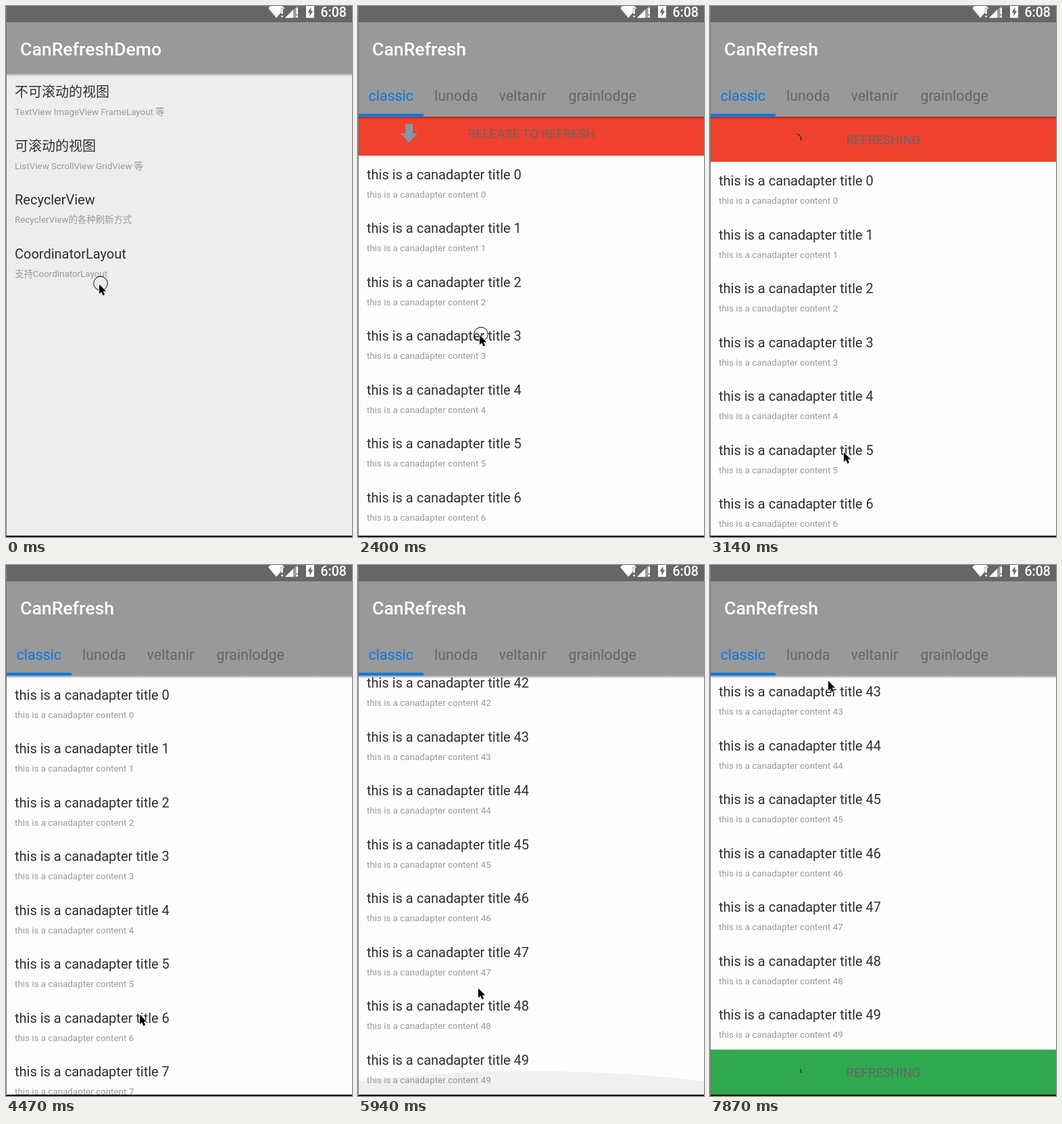
These frames come from a looping animation (512x784 px, 8000 ms). An HTML page:

```html
<!DOCTYPE html>
<html lang="zh-CN">
<head>
<meta charset="utf-8">
<title>CanRefresh</title>
<style>
  html, body { margin: 0; width: 100%; height: 100%; overflow: hidden; background: #000; }
  svg { display: block; font-family: Roboto, "Noto Sans CJK SC", "Noto Sans CJK", sans-serif; }
  .title { font-size: 20px; fill: #2f2f2f; }
  .sub { font-size: 13.4px; fill: #999; }
  .bar { font-size: 26.67px; font-weight: 500; fill: #fff; }
  .tab { font-size: 21.4px; fill: #666; }
  .tab.on { fill: #0a7ae0; }
  .state { font-size: 18.67px; fill: #666; text-anchor: middle; }
  .spin { fill: none; stroke: #333; stroke-width: 1.8; }
  .clock { font-size: 19.5px; font-weight: 500; fill: #fff; }
</style>
</head>
<body>
<svg width="512" height="784" viewBox="0 0 512 784">
  <defs>
    <linearGradient id="shade" x2="0" y2="1">
      <stop offset="0" stop-opacity=".36"/>
      <stop offset="1" stop-opacity="0"/>
    </linearGradient>
    <clipPath id="page"><path d="M0 0H512V782H0Z"/></clipPath>
  </defs>

  <g>
    <path d="M0 0H512V782H0Z" fill="#ededed"/>
    <path d="M0 24H512V99H0Z" fill="#999"/>
    <path d="M0 0H512V24H0Z" fill="#666"/>
    <path d="M0 99H512V104H0Z" fill="url(#shade)"/>
    <text class="bar" x="21" y="72.5">CanRefreshDemo</text>
    <g id="menu"></g>
  </g>

  <g id="window" clip-path="url(#page)">
    <path d="M0 0H512V782H0Z" fill="#fdfdfd"/>
    <path id="red" d="M0 0H512V782H0Z" fill="#ef412e"/>
    <path id="green" d="M0 0H512V782H0Z" fill="#2fa84f"/>
    <g id="header"></g>
    <g id="footer"></g>
    <g id="list"></g>
    <ellipse id="glow" cx="256" rx="768"/>
    <path d="M0 24H512V163.5H0Z" fill="#999"/>
    <path d="M0 0H512V24H0Z" fill="#666"/>
    <path d="M0 163.5H512V167.5H0Z" fill="url(#shade)"/>
    <text class="bar" x="21" y="72.5">CanRefresh</text>
    <text class="tab on" x="15.5" y="139.5">classic</text>
    <text class="tab" x="113" y="139.5">lunoda</text>
    <text class="tab" x="208.5" y="139.5">veltanir</text>
    <text class="tab" x="311.5" y="139.5">grainlodge</text>
    <path d="M1 159H97V163.3H1Z" fill="#0a7ae0"/>
  </g>

  <g fill="#fff">
    <path d="M388 3Q400 -8 412 3L407.5 8.500V9L400 17.500Z"/>
    <path d="M407 3H410V12H407ZM407 14H410V17H407Z" stroke="#666" stroke-width=".6"/>
    <path d="M413 17.500L432 -1V17.500Z" opacity=".35"/>
    <path d="M413 17.500L425 5.500V17.500Z"/>
    <path d="M429.500 3H432V12H429.500ZM429.500 14H432V17H429.500Z"/>
    <path d="M444 0H456V17.500H444Z"/>
    <path d="M451.500 2L446.500 9.500H449.500V15L454 7.500H451.500Z" fill="#666"/>
    <text class="clock" x="465.500" y="15.500">6:08</text>
  </g>
  <path d="M0 0H1V784H0Z" fill="#777"/>

  <g id="pointer">
    <circle id="touch" cx="2" cy="-1.500" r="10.300" fill="none" stroke="#000"/>
    <path d="M0 0V14L3.200 11.200 5.500 16.400 8 15.300 5.800 10.300H10.200Z"
          stroke="#fff" stroke-width="1.600" paint-order="stroke"/>
  </g>
</svg>
<script>
const LOOP = 8000, ROW = 79.5, TOP = 163.5, BOTTOM = 782, PANEL = 66.5;
const PULL = 0.332, READY = 57;
const MAX_SCROLL = 50 * ROW - (BOTTOM - TOP);
const $ = id => document.getElementById(id);
const clamp = v => Math.max(0, Math.min(1, v));
const part = (t, a, b) => clamp((t - a) / (b - a));
const mix = (a, b, u) => a + (b - a) * u;
const smooth = u => u * u * (3 - 2 * u);
const easeOut = u => 1 - (1 - u) ** 3;
const shift = (el, x, y) => el.setAttribute('transform', `translate(${x} ${y})`);
const show = (el, on) => { el.style.display = on ? '' : 'none'; };

const row = (i, title, sub) => `<g transform="translate(13 ${i * ROW})">
  <text class="title" y="35">${title}</text><text class="sub" y="62">${sub}</text></g>`;

const menu = [
  ['不可滚动的视图', 'TextView ImageView FrameLayout 等'],
  ['可滚动的视图', 'ListView ScrollView GridView 等'],
  ['RecyclerView', 'RecyclerView的各种刷新方式'],
  ['CoordinatorLayout', '支持CoordinatorLayout']
];
$('menu').innerHTML = menu.map(([a, b], i) => row(i, a, b)).join('');
shift($('menu'), 0, 99);

$('list').innerHTML = '<path d="M0 0H512V3975H0Z" fill="#fdfdfd"/>' +
  Array.from({ length: 50 }, (_, i) =>
    row(i, `this is a canadapter title ${i}`, `this is a canadapter content ${i}`)).join('');

// Pull panel: arrow, spinner and state label
function panel(id) {
  const root = $(id);
  root.innerHTML = `<path d="M-5.5 -14H5.500V0H12.500L0 14L-12.500 0H-5.500Z" fill="#8796a2"/>
    <circle class="spin" r="9" pathLength="360"/>
    <text class="state" x="256.500" y="40.500"></text>`;
  const [arrow, spin, label] = root.children;
  return (y, amount, angle, busy) => {
    show(root, amount > 0);
    shift(root, 0, y);
    show(arrow, busy < 0);
    show(spin, busy >= 0);
    arrow.setAttribute('transform', `translate(75.500 33.500) rotate(${angle})`);
    label.textContent = busy >= 0 ? 'REFRESHING'
      : amount >= READY ? 'RELEASE TO REFRESH' : 'PULL TO REFRESH';
    if (busy < 0) return;
    const p = busy % 1333 / 1333;
    const head = 270 * smooth(clamp(2 * p)), tail = 270 * smooth(clamp(2 * p - 1));
    spin.setAttribute('stroke-dasharray', `${Math.max(4, head - tail)} 360`);
    spin.setAttribute('transform',
      `translate(126 34) rotate(${busy * 0.1755 + tail - 114})`);
  };
}
const header = panel('header'), footer = panel('footer');

// Pointer path: ms, x, y, power of the easing into the point
const path = [
  [0, 138, 411], [150, 138, 411], [900, 125, 313], [1600, 125, 313],
  [2400, 180, 486], [2680, 198, 659], [4330, 198, 659], [4470, 198, 664],
  [4600, 198, 664], [5060, 185, 98, 2], [5200, 185, 98], [5900, 178, 625],
  [6100, 178, 625], [6580, 205, 190], [7430, 205, 190], [7870, 175, 171], [LOOP, 175, 171]
];
const presses = [[0, 150], [1600, 2780], [4600, 5080], [6100, 6600]];

function pointer(t) {
  const i = path.findIndex((p, n) => n && t <= p[0]);
  const a = path[i - 1], b = path[i];
  const u = part(t, a[0], b[0]) ** (b[3] || 1);
  return [mix(a[1], b[1], u), mix(a[2], b[2], u)];
}

function pullDown(t, y) {
  if (t < 1600 || t > 4430) return 0;
  if (t < 2780) return PULL * (y - 313);
  if (t < 4200) return mix(PULL * (659 - 313), PANEL, easeOut(part(t, 2780, 2980)));
  return PANEL * (1 - easeOut(part(t, 4200, 4430)));
}

function pullUp(t, y) {
  if (t < 6100) return 0;
  if (t < 6600) return PULL * (625 - y);
  return mix(PULL * (625 - 190), PANEL, easeOut(part(t, 6600, 6800)));
}

function scrolled(t, y) {
  if (t < 4600) return 0;
  if (t < 5060) return 664 - y;
  return mix(566, MAX_SCROLL, 1 - (1 - part(t, 5060, 5880)) ** 1.2);
}

function draw(t) {
  const [x, y] = pointer(t);
  shift($('pointer'), x, y);
  show($('touch'), presses.some(([a, b]) => t >= a && t < b));

  show($('window'), t >= 1045);
  shift($('window'), 0, 55 * (1 - part(t, 1045, 1405)) ** 5 * (t < 1350));
  $('window').style.opacity = part(t, 1045, 1165);

  const down = pullDown(t, y), up = pullUp(t, y);
  show($('red'), down > 0);
  show($('green'), up > 0);
  header(TOP + down - PANEL, down, 180 * part(t, 2400, 2550), t < 2900 ? -1 : t - 2900);
  footer(BOTTOM - up, up, 180 + 180 * part(t, 6300, 6450), t < 6697 ? -1 : t - 6697);
  shift($('list'), 0, TOP + down - up - scrolled(t, y));

  const fade = t < 5880 ? 0 : 1 - part(t, 5880, 6480);
  const rise = 38.5 * fade;
  $('glow').setAttribute('cy', BOTTOM - rise + 7.46 * rise);
  $('glow').setAttribute('ry', 7.46 * rise);
  $('glow').style.opacity = 0.058 * fade;
}

// The screen refreshes in held steps: end of span, number of steps
const spans = [[2400, 16], [2540, 1], [4470, 13], [5940, 10], [7870, 13], [LOOP, 1]];
function hold(t) {
  let from = 0;
  for (const [to, n] of spans) {
    if (t < to) return from + (to - from) * Math.floor((t - from) / (to - from) * n) / n;
    from = to;
  }
  return 0;
}

const start = performance.now();
function frame() {
  draw(hold((performance.now() - start) % LOOP));
  requestAnimationFrame(frame);
}
frame();
</script>
</body>
</html>
```
